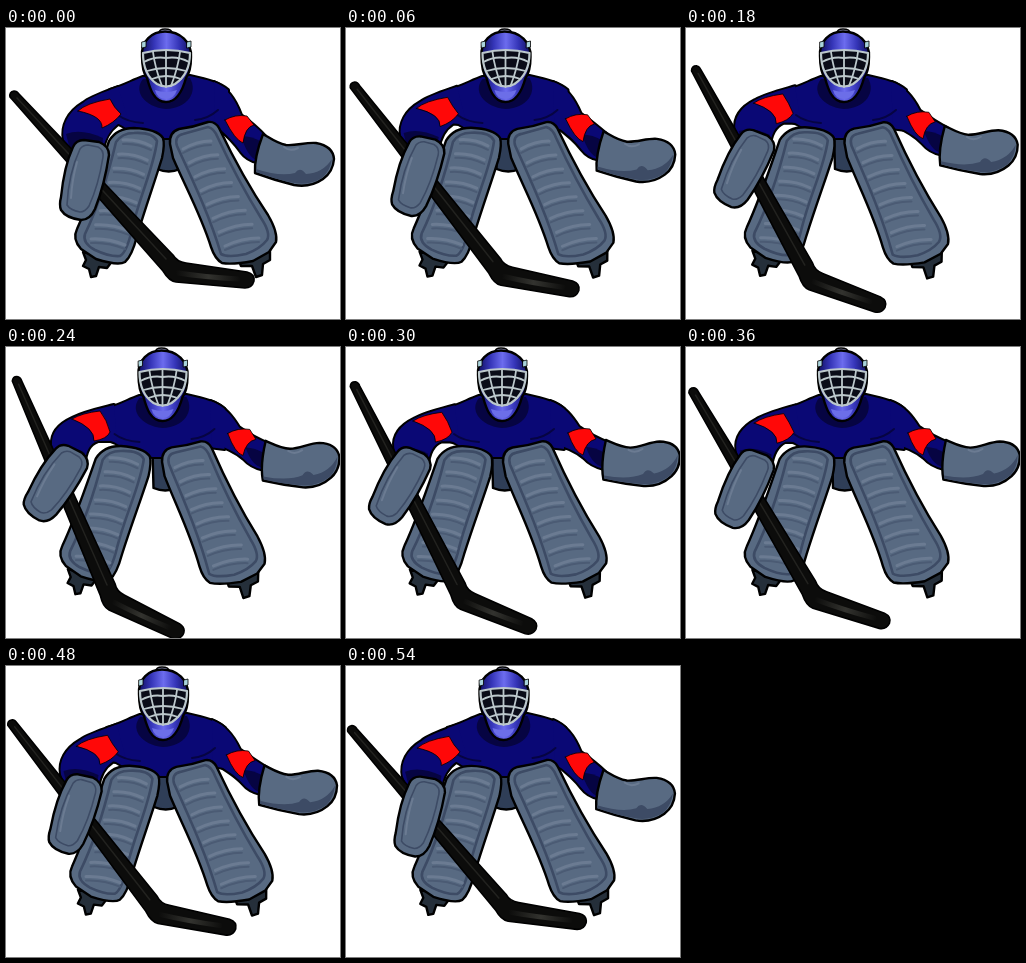
Write an HTML page with a canvas that moves like this. It is 334x291 px and loops after 600 ms.

```html
<!DOCTYPE html>
<html lang="en">
<head>
<meta charset="utf-8">
<title>Goalie</title>
<style>
html, body { margin: 0; width: 100%; height: 100%; overflow: hidden; background: #fff; }
canvas { display: block; }
</style>
</head>
<body>
<canvas id="stage" width="334" height="291"></canvas>
<script>
const ctx = document.getElementById('stage').getContext('2d');
const NAVY = '#0a0875', SHADE = '#060442', RED = '#ff0808';
const PAD = '#586a82', GROOVE = '#3d4b65', LIGHT = '#6b7b92', BAR = '#bcc8cc';

// One value per 60 ms step
const STEP = 60;
const swing = [0, .24, .48, .72, 1, .82, .63, .44, .25, .09];
const lift = [0, .2, .4, .62, .93, 1, 1, .75, .5, .15];
const sway = [0, -.5, -1, -2, -3.5, -4, -4, -3.5, -3, -2.5];

function shape(d, fill, stroke = '#000', width = 2.4) {
  const path = new Path2D(d);
  if (fill) { ctx.fillStyle = fill; ctx.fill(path); }
  if (stroke) { ctx.strokeStyle = stroke; ctx.lineWidth = width; ctx.stroke(path); }
}
const line = (d, color, width) => shape(d, null, color, width);

// Blend two paths that share the same commands
function mix(a, b, k) {
  const number = /-?\d+(\.\d+)?/g, ends = b.match(number);
  let i = 0;
  return a.replace(number, n => +n + (ends[i++] - n) * k);
}

// Draw a part moved by dx, dy and turned by deg around a pivot
function part(dx, dy, deg, px, py, draw) {
  ctx.save();
  ctx.translate(px + dx, py + dy);
  ctx.rotate(deg * Math.PI / 180);
  ctx.translate(-px, -py);
  draw();
  ctx.restore();
}

function gradient(x0, y0, x1, y1, ...colors) {
  const g = ctx.createLinearGradient(x0, y0, x1, y1);
  colors.forEach((c, i) => g.addColorStop(i / (colors.length - 1), c));
  return g;
}

function ribs(x0, y0, x1, y1, half, tilt) {
  for (let i = 0; i < 8; i++) {
    const k = i / 7, x = x0 + (x1 - x0) * k, y = y0 + (y1 - y0) * k, w = half + 3 * k;
    const rib = top => `M${x - w} ${y - tilt + top}q${w} ${tilt - 4} ${2 * w} ${2 * tilt}`;
    line(rib(4), '#4b5b74', 2);
    line(rib(0), LIGHT, 3);
  }
}

function jersey(p, g, x) {
  const chest = 'M137 49C126 53 117 58 104 62L100 92C113 94 118 99 125 104L150 110L172 110L190 98L222 102L222 62C214 55 202 52 184 48Z';
  const leftSleeve = mix('M112 59C96 65 84 69 77 75C62 84 55 98 58 112L64 124L97 123C98 112 104 102 112 96L124 97Z',
                         'M108 58C92 62 78 65 66 71C53 77 45 86 46 98L49 116L78 119C80 104 83 97 92 94L111 94Z', p);
  const rightSleeve = mix('M208 54C222 60 230 73 235 87Q250 98 259 108L251 134Q241 132 235 124C229 115 222 108 209 97Z',
                          'M204 54C219 59 227 71 233 80Q247 90 263 96L258 122Q245 119 238 111C230 104 219 100 205 95Z', g);
  // All outlines first, so that no seams show
  for (const [fill, stroke] of [[null, '#000'], [NAVY, null]]) {
    part(x, 0, 0, 0, 0, () => shape(chest, fill, stroke, 4));
    shape(leftSleeve, fill, stroke, 4);
    shape(rightSleeve, fill, stroke, 4);
  }
  part(x, 0, 0, 0, 0, () => {
    shape('M137 51C127 63 138 79 160 81C182 80 192 64 184 50Z', SHADE, null);
    line('M112 87Q121 94 137 95M189 92Q202 91 212 82', SHADE, 2);
  });
  shape(mix('M60 106Q75 100 97 110L96 120L64 121Z', 'M50 102Q65 98 79 106L76 117L51 113Z', p), SHADE, null);
  shape(mix('M235 108Q246 108 256 114L251 132Q242 130 235 108Z', 'M240 100Q249 100 259 106L257 120Q246 118 240 100Z', g), SHADE, null);
  shape(mix('M72 83Q80 75 104 71Q108 80 115 86Q108 95 96 100Q97 88 72 83Z',
            'M66 72Q76 66 94 64Q101 73 104 85Q101 92 88 94Q89 81 66 72Z', p), RED, '#000', .8);
  shape(mix('M219 92Q229 86 241 88L248 97Q239 99 237 115Q229 112 219 92Z',
            'M222 86Q232 80 244 82L250 92Q240 94 237 108Q229 106 222 86Z', g), RED, '#000', .8);
}

function head() {
  shape('M153 5Q153 1 159 1Q166 1 166 5Z', '#b9bdf0', '#000', 1.5);
  shape('M136 28C135 13 146 3.5 159 3.5C174 3.5 186 14 185 29C185 38 183 46 180 50C177 61 172 74 160 74C148 74 144 61 141 50C137 45 136 38 136 28Z',
    gradient(136, 0, 185, 0, '#0f0f5e', '#3535b8', '#6c6cee', '#3535b8', '#0f0f5e'));
  shape('M149 62Q160 66 171 62Q168 71 160 71Q151 71 149 62Z', '#6c6ee8', null);
  for (const x of [138, 183]) shape(`M${x - 2} 14l4 -1v6l-4 1z`, '#a9d4dc', '#000', .8);
  shape('M137 25Q160 19 184 25C184 41 178 50 169 56Q160 61 151 56C142 50 137 41 137 25Z', '#0a0c18', BAR, 2.2);
  line('M138 34Q149 28 160 30Q172 28 183 34M141 43Q160 37 180 43M146 51Q160 45 175 51', BAR, 1.8);
  line('M147 24Q149 40 156 58M174 24Q172 40 165 58M160 23V59', BAR, 1.8);
}

function leftPad() {
  shape('M77 224L107 232L101 240L93 239L90 248L85 249L83 241L77 238L80 232Z', '#252f3a');
  shape('M103 113C109 103 119 100 128 100Q151 101 157 110Q159 116 156 130C148 156 140 178 131 208Q126 228 119 234Q112 238 90 231L75 221Q66 211 71 201C84 172 94 140 103 113Z', PAD);
  shape('M110 114Q116 105 128 105Q147 104 151 113C148 139 134 167 126 201Q121 224 114 228Q104 229 89 222Q76 215 79 206C91 181 102 148 110 114Z', PAD, GROOVE, 2.6);
  ribs(131, 115, 102, 214, 14, 3);
}

function rightPad() {
  shape('M232 230L264 222L264 232L257 236L256 247L250 249L246 238L235 238Z', '#252f3a');
  shape('M164 116Q163 104 173 101Q188 99 202 94Q209 93 213 100C224 123 239 153 262 187Q272 204 270 214L263 224L247 233Q226 237 216 235Q209 231 205 219C195 187 179 158 167 130Z', PAD);
  shape('M171 118Q168 108 177 106L202 99Q208 100 212 110C224 136 239 164 255 190Q265 205 261 212Q254 221 240 226Q222 230 215 226C204 189 188 155 171 118Z', PAD, GROOVE, 2.6);
  ribs(191, 117, 236, 214, 14, -4);
}

function glove() {
  shape('M257 106C264 110 270 115 280 117C290 118 300 114 310 115Q327 118 328 131Q327 144 317 151Q304 160 288 157Q268 152 249 145Q248 130 257 106Z', PAD);
  shape('M250 141Q274 149 289 145Q294 138 300 146Q317 145 326 131Q324 143 316 150Q302 158 288 155Q268 151 250 144Z', GROOVE, null);
  line('M278 119Q284 124 292 120', LIGHT, 2);
}

function stick() {
  shape('M4 69Q3 64 8 63Q11 63 13 66L167 227Q171 234 180 235L241 244Q249 246 248 253Q246 260 239 260L170 254Q163 253 157 243Z', '#0c0c0b', '#000', 1.6);
  line('M11 70L160 231', '#22221f', 1.5);
  line('M172 245Q198 249 232 251', gradient(170, 0, 235, 0, '#0c0c0b', '#33332f', '#0c0c0b'), 5);
}

function blocker() {
  shape('M67 119Q70 112 78 112L93 114Q103 118 103 127C100 147 95 166 89 181Q84 192 75 192Q60 190 55 182Q53 177 55 169C57 149 61 132 67 119Z', PAD);
  shape('M74 121Q77 117 82 117L92 119Q98 122 97 129C94 148 89 165 83 178Q79 184 74 184Q64 182 61 177C62 155 67 136 74 121Z', PAD, GROOVE, 1.6);
  line('M71 134Q66 152 65 170', LIGHT, 2);
}

function draw(step) {
  const p = swing[step], g = lift[step], x = sway[step];
  ctx.clearRect(0, 0, 334, 291);
  part(x, 0, 0, 0, 0, () => shape('M150 104L176 104L174 141Q163 146 151 141Z', '#2f3e57'));
  jersey(p, g, x);
  part(x, 0, 0, 0, 0, head);
  part(-11 * p + x * .6, -p, p, 130, 105, leftPad);
  part(-6 * p + x * .4, 0, 2 * p, 190, 100, rightPad);
  part(6 * g, -13 * g, -8 * g, 255, 128, glove);
  part(-25 * p + x, -15 * p, 19 * p, 79, 151, () => { stick(); blocker(); });
}

ctx.lineJoin = ctx.lineCap = 'round';
function tick() {
  draw(Math.floor(performance.now() / STEP) % swing.length);
  requestAnimationFrame(tick);
}
tick();
</script>
</body>
</html>
```
